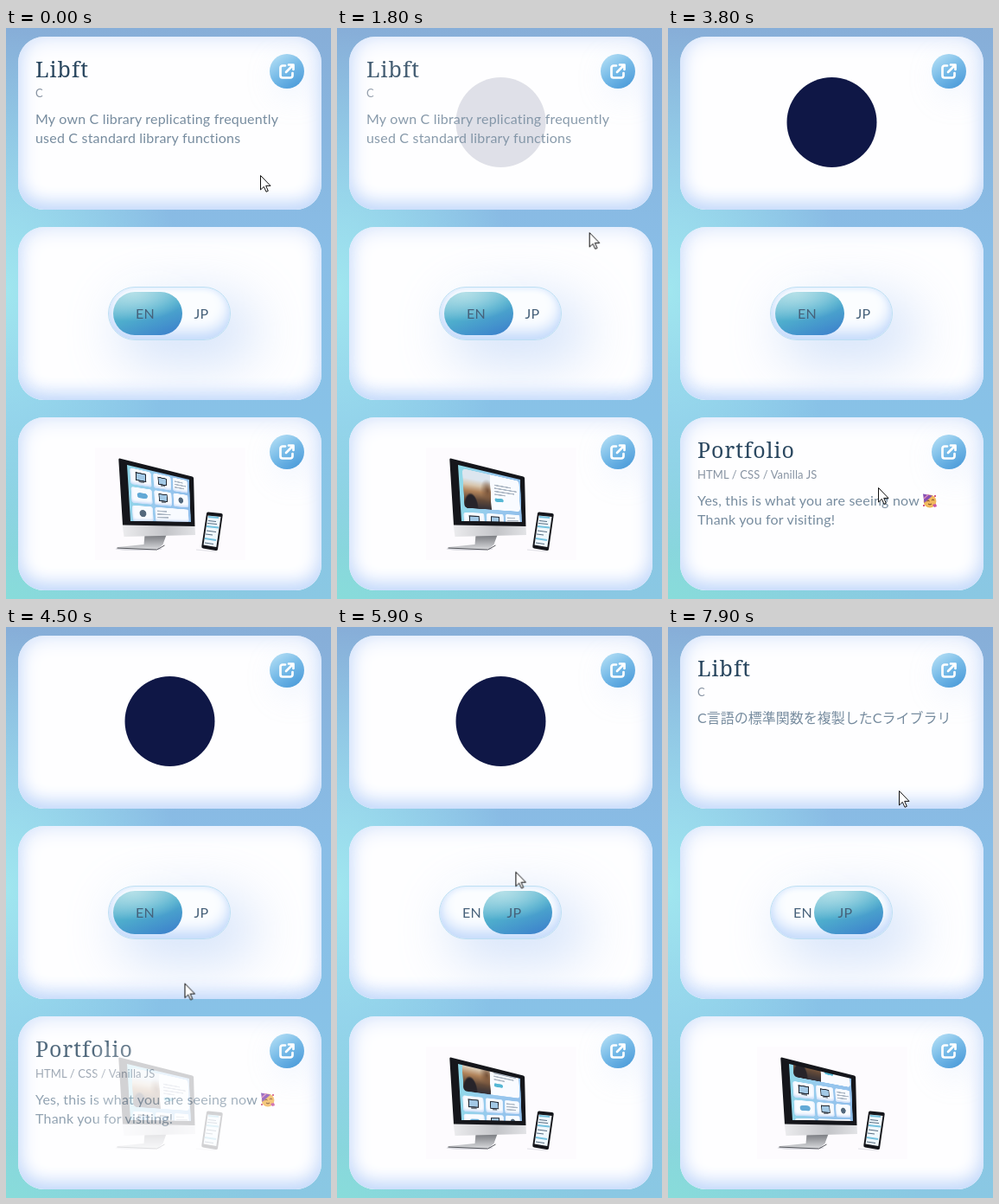
An HTML page for the animation above (8 s loop, 376x660 px).

```html
<!DOCTYPE html>
<html lang="en">
<head>
<meta charset="utf-8">
<title>Project cards</title>
<style>
html, body { margin: 0; width: 100%; height: 100%; overflow: hidden; }
body {
  position: relative;
  background:
    radial-gradient(ellipse 200px 300px at 0 46%, #a0e6ef, #a0e6ef00),
    radial-gradient(ellipse 290px 210px at 0 100%, #88dcda, #88dcda00),
    linear-gradient(#87aed8, #89bde6 38%, #88c2e7 68%, #8ac8e3);
}
svg, .layer { position: absolute; left: 0; top: 0; width: 376px; height: 660px; }
text { font: 16px Lato, "Noto Sans CJK JP", "Noto Sans CJK", sans-serif; letter-spacing: .2px; fill: #778c9f; }
.title { font: 500 25px "Noto Serif", serif; letter-spacing: 1px; fill: #2b4860; }
.sub { font-size: 13px; letter-spacing: .1px; fill: #8894a3; }

.card {
  position: absolute; left: 14px; width: 351px; height: 200px;
  border-radius: 30px; overflow: hidden; background: #fefeff;
}
.card::after {
  content: ""; position: absolute; inset: 0; border-radius: 30px;
  box-shadow: inset 0 -10px 20px -4px #c1d8fb, inset 0 0 26px #d3e1fa;
}
.link {
  position: absolute; left: 291px; top: 20px; width: 40px; height: 40px; border-radius: 50%;
  background: linear-gradient(145deg, #b2def5 8%, #74b9e7 50%, #4798d8 95%);
  box-shadow: 8px 8px 36px #bcd4fb40;
}
.link svg { width: 40px; height: 40px; }

.switch {
  position: absolute; left: 104px; top: 69px; box-sizing: border-box; width: 142px; height: 62px;
  border: 1px solid #bddff3; border-radius: 31px; background: #fbfdff;
  box-shadow: 20px 20px 60px 8px #a9c8f578, -20px -20px 60px #fff, inset 0 -9px 16px #c4dafb, inset 0 0 7px #dceafc;
}
.knob {
  position: absolute; left: 5px; top: 5px; width: 80px; height: 50px; border-radius: 25px;
  background: radial-gradient(ellipse 65px 34px at 28% 0, #b5e0e8, #b5e0e800), linear-gradient(160deg, #85cbdc 5%, #4eadcd 48%, #3f87cc 88%);
}
.label {
  position: absolute; top: 0; width: 60px; text-align: center;
  font: 16px/60px Lato, sans-serif; letter-spacing: .2px; color: #46617a;
}
.en { left: 12px; }
.jp { left: 77px; }

.screen { position: absolute; left: 0; top: 0; width: 160px; height: 110px; overflow: hidden; transform-origin: 0 0; }
.page { position: absolute; width: 160px; height: 220px; background: linear-gradient(100deg, #8fdbe8, #98c8ee 45%, #8fbdea); }
.page * { position: absolute; }
.hero { left: 8px; top: 5px; width: 147px; height: 78px; border-radius: 7px; background: #f9fbff; overflow: hidden; }
.photo {
  left: 0; top: 0; width: 62px; height: 78px;
  background:
    radial-gradient(ellipse 16px 32px at 24% 100%, #27242a 85%, #27242a00),
    radial-gradient(ellipse 18px 26px at 88% 48%, #765239, #76523900),
    linear-gradient(#dce6ef 22%, #d8c6ae 38%, #b1835a 54%, #634a39 76%, #333037);
}
.line { height: 3px; border-radius: 2px; background: #aab5c2; }
.action { left: 72px; top: 51px; width: 24px; height: 8px; border-radius: 4px; background: #55b7d4; }
.tile { height: 32px; border-radius: 5px; background: #f8fbff; box-shadow: inset 0 -3px 5px #c4d9f8; }

/* Shared 8 s timeline: 1% is 80 ms */
.anim { animation: 8s linear infinite; }
.badge { animation-name: badge; }
.about { animation-name: about; }
.mock { animation-name: mock; }
.portfolio { animation-name: portfolio; }
.english { animation-name: english; }
.japanese { animation-name: japanese; }
.knob { animation-name: knob; }
.en { animation-name: en; }
.jp { animation-name: jp; }
.cursor { animation-name: cursor; animation-timing-function: ease-in-out; }
.page { animation-name: scroll; animation-timing-function: ease-in-out; }

@keyframes about { 0%, 22% { opacity: 1 } 26%, 77% { opacity: 0 } 81%, 100% { opacity: 1 } }
@keyframes badge { 0%, 22% { opacity: 0 } 26%, 77% { opacity: 1 } 81%, 100% { opacity: 0 } }
@keyframes mock { 0%, 31% { opacity: 1 } 35%, 55.5% { opacity: 0 } 59.5%, 100% { opacity: 1 } }
@keyframes portfolio { 0%, 31% { opacity: 0 } 35%, 55.5% { opacity: 1 } 59.5%, 100% { opacity: 0 } }
@keyframes english { 0%, 68.75% { opacity: 1 } 68.76%, 100% { opacity: 0 } }
@keyframes japanese { 0%, 68.75% { opacity: 0 } 68.76%, 100% { opacity: 1 } }
@keyframes knob { 0%, 68.75% { transform: none } 72.5%, 100% { transform: translateX(45px) } }
@keyframes en { 0%, 68.75% { transform: none } 72.5%, 100% { transform: translateX(-5px) } }
@keyframes jp { 0%, 68.75% { transform: none } 72.5%, 100% { transform: translateX(-21px) } }
@keyframes scroll {
  0%, 4% { transform: translateY(-88px) }
  13%, 70% { transform: none }
  79%, 94% { transform: translateY(-88px) }
  98.75%, 100% { transform: translateY(-60px) }
}
@keyframes cursor {
  0%, 19% { transform: translate(294px, 170px) }
  30% { transform: translate(283px, 481px) }
  38%, 51% { transform: translate(243px, 531px) }
  61%, 67% { transform: translate(176px, 312px) }
  70% { transform: translate(184px, 318px) }
  80%, 84% { transform: translate(260px, 198px) }
  91%, 100% { transform: translate(267px, 189px) }
}
</style>
</head>
<body>
<div class="card" style="top:10px"><div class="link"></div></div>
<div class="card" style="top:230px">
  <div class="switch">
    <div class="anim knob"></div>
    <div class="anim label en">EN</div>
    <div class="anim label jp">JP</div>
  </div>
</div>
<div class="card" style="top:450px"><div class="link"></div></div>

<svg viewBox="0 0 376 660">
  <circle class="anim badge" cx="189.5" cy="109" r="52" fill="#0f1746"/>
  <g class="anim about">
    <text class="title" x="34" y="57">Libft</text>
    <text class="sub" x="34" y="80">C</text>
    <g class="anim english">
      <text x="34" y="111">My own C library replicating frequently</text>
      <text x="34" y="133">used C standard library functions</text>
    </g>
    <text class="anim japanese" lang="ja" x="34" y="111" style="letter-spacing:0">C言語の標準関数を複製したCライブラリ</text>
  </g>
  <g class="anim portfolio">
    <text class="title" x="34" y="497">Portfolio</text>
    <text class="sub" x="34" y="521">HTML / CSS / Vanilla JS</text>
    <text x="34" y="552">Yes, this is what you are seeing now</text>
    <text x="34" y="574">Thank you for visiting!</text>
    <g transform="translate(303 547)">
      <circle r="7.4" fill="#f2b95d"/>
      <path d="M-8-8.5 3-6.5-6.5 2Z" fill="#8650b4"/>
      <path d="M-7-3-1.5-8" stroke="#e18cba" stroke-width="1.5"/>
      <path d="M-3.5 0q1.5-2 3 0M2 -1q1.5-2 3 0M-2 3q2 2 4 0" fill="none" stroke="#6b402b"/>
      <path d="M3 4l4-1 1 3-3 1z" fill="#c755a4"/>
      <path d="M5-7h2v2h-2zM-8 4h2v2h-2z" fill="#d25a86"/>
    </g>
  </g>
</svg>

<div class="layer anim mock">
  <svg viewBox="0 0 376 660">
    <defs>
      <linearGradient id="metal"><stop stop-color="#ececee"/><stop offset=".6" stop-color="#c3c4c8"/><stop offset="1" stop-color="#e2e3e6"/></linearGradient>
      <linearGradient id="stand" x2="0" y2="1"><stop stop-color="#77797e"/><stop offset="1" stop-color="#dadbde"/></linearGradient>
    </defs>
    <path d="M103 485H277V615H103Z" fill="#fdfbfe"/>
    <g transform="translate(1.5 0)">
      <ellipse cx="152" cy="602" rx="27" ry="2" fill="#d8d8df"/>
      <path d="M159 586h25l-4 11-7 6-46-1 1-2 30-3z" fill="url(#stand)"/>
      <path d="M127 601l46 2 9-5" fill="none" stroke="#55575d"/>
      <path d="M133 573 217 575 217.500 586 135 588Z" fill="url(#metal)"/>
      <path d="M130 497.500 214 518.500Q215.500 519 215.600 520.500L217 576 133.500 574.500 128.800 499Q128.700 497 130 497.500Z" fill="#15161b"/>
    </g>
    <path d="M234 559.500 249 561Q251 561.300 250.700 563L245 602.500Q244.600 604.500 242.500 604L228 601.500Q226 601 226.300 599L232 561Q232.300 559.300 234 559.500Z" fill="#15161b"/>
    <path d="M233.500 563.500 248.500 565 243.300 600 228.500 597.500Z" fill="#f0f8fd"/>
    <path d="M234 565l12 1M232 576l14 1.500M230 590l13 2" stroke="#75c2df" stroke-width="2"/>
    <path d="M234 569.500l9 1M233 572.500l11 1M232 581l11 1.500M231 585l8 1M230 595l10 1.500" stroke="#566c80"/>
    <path d="M220 603l22 2" stroke="#e0e0e6"/>
  </svg>
  <div class="screen"><div class="anim page">
    <div class="hero"><div class="photo"></div><div class="action"></div></div>
  </div></div>
</div>

<svg viewBox="0 0 376 660">
  <path class="anim cursor" d="M.5.5V17L4.300 13.400 7 19.300 9.300 18.300 6.700 12.400H12Z" fill="#fff" stroke="#111" stroke-linejoin="round"/>
</svg>

<script>
const $ = s => document.querySelector(s);

for (const link of document.querySelectorAll('.link')) {
  link.innerHTML = `<svg viewBox="-20 -20 40 40" fill="none" stroke="#fff" stroke-width="2.7" stroke-linecap="round" stroke-linejoin="round">
    <path d="M-2-6.500H-5A2.500 2.500 0 0 0-7.500-4V5A2.500 2.500 0 0 0-5 7.500H4A2.500 2.500 0 0 0 6.500 5V2M2-7.500H7.500V-2M7-7-1 1"/></svg>`;
}

function add(parent, cls, x, y, w, style = '') {
  const el = document.createElement('div');
  el.className = cls;
  el.style.cssText = `left:${x}px;top:${y}px;width:${w}px;${style}`;
  parent.append(el);
  return el;
}

[48, 66, 58, 30].forEach((w, i) => add($('.hero'), 'line', 72, 20 + i * 7, w));

// Tiles: column, row, width
const tiles = [
  [0, 0, 46], [1, 0, 46], [2, 0, 46],
  [0, 1, 46], [1, 1, 46], [2, 1, 46],
  [0, 2, 46], [1, 2, 97]
];
tiles.forEach(([col, row, w], i) => {
  const tile = add($('.page'), 'tile', 5 + col * 51, 92 + row * 37, w);
  if (i < 2 || i === 4) {
    add(tile, '', 11, 6, 23, 'height:17px;background:#a3c9e6;border:2px solid #202630;box-sizing:border-box');
    add(tile, '', 17, 23, 12, 'height:3px;background:#777f88');
  } else if (i === 3) {
    add(tile, '', 12, 10, 23, 'height:11px;border-radius:6px;background:#62a9d6');
  } else if (i === 5 || i === 6) {
    add(tile, '', 15, 8, 15, 'height:15px;border-radius:50%;background:#53687c');
  } else {
    [26, 36, 30].forEach((len, n) => add(tile, 'line', 5, 7 + n * 7, len));
  }
});

// Maps the flat page onto the tilted monitor
function project(el, w, h, [[x0, y0], [x1, y1], [x2, y2], [x3, y3]]) {
  const ax = x1 - x2, ay = y1 - y2, bx = x3 - x2, by = y3 - y2;
  const sx = x0 - x1 + x2 - x3, sy = y0 - y1 + y2 - y3;
  const det = ax * by - bx * ay;
  const g = (sx * by - bx * sy) / det, k = (ax * sy - sx * ay) / det;
  const m = [
    (x1 - x0 + g * x1) / w, (y1 - y0 + g * y1) / w, 0, g / w,
    (x3 - x0 + k * x3) / h, (y3 - y0 + k * y3) / h, 0, k / h,
    0, 0, 1, 0,
    x0, y0, 0, 1
  ];
  el.style.transform = `matrix3d(${m.map(v => v.toFixed(8))})`;
}
project($('.screen'), 160, 110, [[140, 505], [212, 522], [214, 571], [144, 570]]);
</script>
</body>
</html>
```
